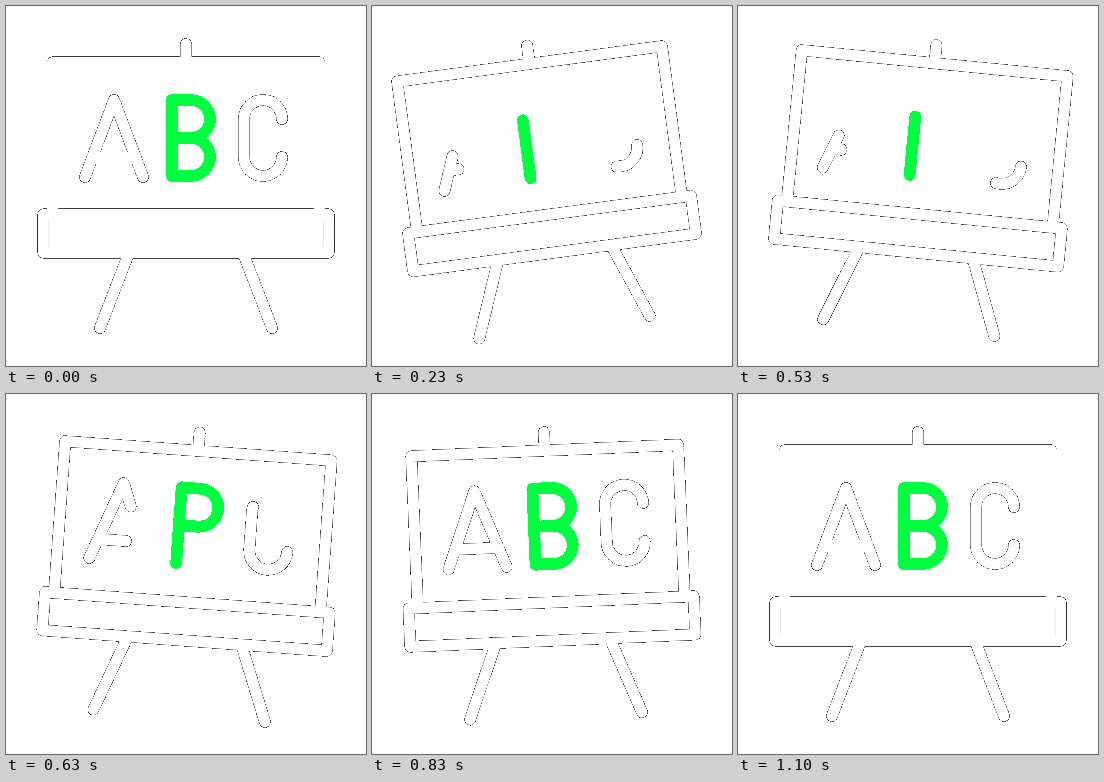
An HTML page with a canvas that plays this animation: 360 px wide and 360 px high, repeating every 1670 ms.

```html
<!DOCTYPE html>
<html>
<head>
<meta charset="utf-8">
<style>
html, body { margin: 0; width: 100%; height: 100%; overflow: hidden; background: #fff; }
canvas { display: block; width: 100vw; height: 100vh; }
</style>
</head>
<body>
<canvas id="stage" width="360" height="360"></canvas>
<script>
const SIZE = 360, LOOP = 1670, FPS = 30, PI = Math.PI;
const STROKE = 11.1, PIVOT_X = 180, PIVOT_Y = 227, MIN_COVER = 0.15;

const view = document.getElementById('stage').getContext('2d');
const maskCanvas = document.createElement('canvas');
maskCanvas.width = maskCanvas.height = SIZE;
const mask = maskCanvas.getContext('2d', { willReadFrequently: true });

// [tick, value] keys, eased in and out between neighbours
const swing = [[0, 0], [11.15, -11], [17, 7], [23, -4], [29, 2], [33, 0]];
const drawn = [[0, 1], [10, 0], [13, 0], [23, 1]];

function valueAt(keys, tick) {
  for (let i = 1; i < keys.length; i++) {
    const [t0, a] = keys[i - 1], [t1, b] = keys[i];
    if (tick <= t1) {
      const u = (tick - t0) / (t1 - t0);
      return a + (b - a) * u * u * (3 - 2 * u);
    }
  }
  return keys[keys.length - 1][1];
}

function polyline(path, ...points) {
  points.forEach(([x, y], i) => i ? path.lineTo(x, y) : path.moveTo(x, y));
  return path;
}

const easel = new Path2D();
polyline(easel, [46.52, 208.3], [46.52, 56.37], [313.48, 56.37], [313.48, 208.3]);
easel.rect(37.37, 208.37, 285.26, 38.26);
polyline(easel, [180, 56], [180, 38]);
polyline(easel, [122.9, 247], [94, 322]);
polyline(easel, [237.1, 247], [266, 322]);

const curve = PI * 19;
const legs = { path: polyline(new Path2D(), [79, 171], [108, 94], [137, 171]), length: 2 * Math.hypot(29, 77) };
const bar = { path: polyline(new Path2D(), [86.3, 151.5], [129.7, 151.5]), length: 43.4 };

const letterC = { path: new Path2D(), length: 2 * curve + 38 };
letterC.path.arc(257, 151, 19, 0, PI);
letterC.path.arc(257, 113, 19, PI, 2 * PI);

const letterB = { path: new Path2D(), length: 76 + 4 * 19 + 2 * curve };
polyline(letterB.path, [166, 170], [166, 94], [185, 94]);
letterB.path.arc(185, 113, 19, -PI / 2, PI / 2);
letterB.path.lineTo(166, 132);
letterB.path.lineTo(185, 132);
letterB.path.arc(185, 151, 19, -PI / 2, PI / 2);
letterB.path.lineTo(166, 170);

function setPose(ctx, degrees) {
  ctx.setTransform(1, 0, 0, 1, 0, 0);
  ctx.clearRect(0, 0, SIZE, SIZE);
  ctx.translate(PIVOT_X, PIVOT_Y);
  ctx.rotate(degrees * PI / 180);
  ctx.translate(-PIVOT_X, -PIVOT_Y);
  ctx.lineWidth = STROKE;
  ctx.lineCap = ctx.lineJoin = 'round';
}

function strokePart(ctx, { path, length }, part) {
  if (part < 0.002) return;
  ctx.setLineDash(part < 0.999 ? [length * part, 1000] : []);
  ctx.stroke(path);
  ctx.setLineDash([]);
}

// White strokes darken where they only partly cover a pixel; green stays solid
function hardEdges() {
  const image = mask.getImageData(0, 0, SIZE, SIZE), px = image.data;
  for (let i = 0; i < px.length; i += 4) {
    const cover = px[i + 3] / 255;
    const isGreen = px[i] < 128;
    if (cover < MIN_COVER) {
      px[i] = px[i + 1] = px[i + 2] = 255;
    } else if (isGreen) {
      px[i] = 0;
      px[i + 1] = 255;
      px[i + 2] = 64;
    } else {
      px[i] = px[i + 1] = px[i + 2] = 255 * cover;
    }
    px[i + 3] = 255;
  }
  return image;
}

function render(tick) {
  const part = valueAt(drawn, tick);
  setPose(mask, valueAt(swing, tick));
  mask.strokeStyle = '#fff';
  mask.stroke(easel);
  for (const shape of [legs, bar, letterC]) strokePart(mask, shape, part);
  mask.strokeStyle = '#00ff40';
  strokePart(mask, letterB, part);
  view.putImageData(hardEdges(), 0, 0);
}

let last = -1;
function loop() {
  const time = performance.now() % LOOP;
  const tick = Math.min(33, Math.floor((time + 4) * FPS / 1000));
  if (tick !== last) render(last = tick);
  requestAnimationFrame(loop);
}
loop();
</script>
</body>
</html>
```
